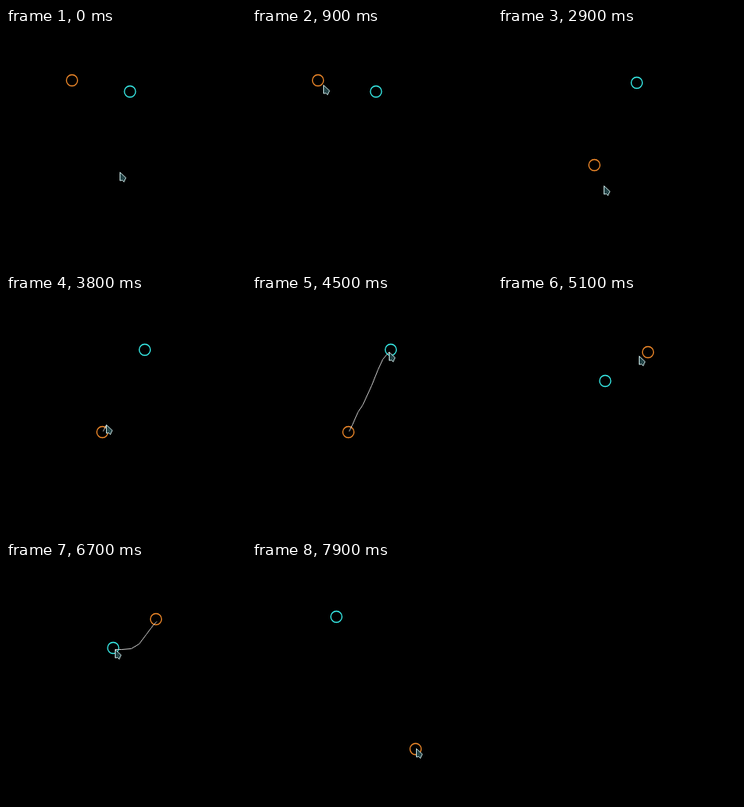
Write an HTML page with a canvas that moves like this. It is 300 by 299 pixels and loops after 8000 ms.

```html
<!DOCTYPE html>
<html>
<head>
<meta charset="utf-8">
<style>
  html, body { margin: 0; height: 100%; overflow: hidden; background: #000; }
  canvas { display: block; }
</style>
</head>
<body>
<canvas id="stage" width="300" height="299"></canvas>
<script>
const ctx = document.getElementById('stage').getContext('2d');
const LOOP = 80; // tenths of a second

// Each round: when it appears, when its drag begins, start ring, goal ring
const rounds = [
  { from: 0,  drag: 10,   start: [82.5, 65.5],   goal: [155, 79.5] },
  { from: 19, drag: 36,   start: [120.5, 171.5], goal: [173.5, 68.5] },
  { from: 46, drag: 59,   start: [187.5, 71.5],  goal: [134, 107.5] },
  { from: 69, drag: LOOP, start: [204.5, 234],   goal: [105.5, 68.5] },
];

// Pointer keys: tick, x, y
const keys = [
  [0, 142, 180], [5, 109, 102], [9, 89, 71], [10, 83, 67], [14, 118, 74], [18, 153, 79],
  [24, 173, 67], [25, 173, 67], [27, 157, 115], [29, 132, 197], [30, 127, 201],
  [34, 121, 170], [36, 121, 170], [38, 125, 162], [39, 132, 146], [40, 138, 137],
  [41, 149, 113], [43, 163, 80], [45, 171, 71], [53, 178, 77], [58, 188, 74],
  [59, 188, 74], [62, 181, 82], [65, 156, 108], [67, 136, 109], [69, 136, 110],
  [73, 180, 192], [76, 212, 243], [79, 205, 233],
];

function slope(i, axis) {
  const a = keys[i], b = keys[i + 1];
  return a && b ? (b[axis] - a[axis]) / (b[0] - a[0]) : 0;
}

// Monotone tangent: smooth between keys, flat at turns and rests
function tangent(i, axis) {
  const p = slope(i - 1, axis), q = slope(i, axis);
  return p * q > 0 ? 2 * p * q / (p + q) : 0;
}

function pointerAt(tick) {
  const i = Math.max(0, keys.findIndex(key => key[0] >= tick) - 1);
  const a = keys[i], b = keys[i + 1];
  const span = b[0] - a[0], k = (tick - a[0]) / span;
  const ease = k * k * (3 - 2 * k);
  return [1, 2].map(axis => Math.round(
    a[axis] + (b[axis] - a[axis]) * ease +
    span * k * (1 - k) * ((1 - k) * tangent(i, axis) - k * tangent(i + 1, axis))));
}

function trace(points, dx, dy) {
  ctx.beginPath();
  for (const [x, y] of points) ctx.lineTo(x + dx, y + dy);
}

function stroke(color, width) {
  ctx.strokeStyle = color;
  ctx.lineWidth = width;
  ctx.stroke();
}

function ring([x, y], color) {
  ctx.beginPath();
  ctx.arc(x, y, 7, 0, Math.PI * 2);
  stroke(color, 1.3);
}

function cursor([x, y]) {
  trace([[0, 0], [0, 10.5], [3, 10], [5, 12.2], [6, 9.5], [7.5, 7]], x + 0.5, y + 0.5);
  ctx.closePath();
  ctx.fillStyle = '#234346';
  ctx.fill();
  stroke('#c4dede', 1);
}

function draw(tick) {
  const round = rounds.filter(r => r.from <= tick).pop();
  ctx.fillStyle = '#000';
  ctx.fillRect(0, 0, 300, 299);
  ring(round.start, '#f28a2a');
  ring(round.goal, '#38f0ec');
  if (tick > round.drag) {
    const trail = [];
    for (let i = round.drag; i <= tick; i++) trail.push(pointerAt(i));
    trace(trail, 0.5, 0.5);
    stroke('#c8c8c8', 1);
  }
  cursor(pointerAt(tick));
}

function frame() {
  draw(Math.floor(performance.now() / 100) % LOOP);
  requestAnimationFrame(frame);
}
frame();
</script>
</body>
</html>
```
